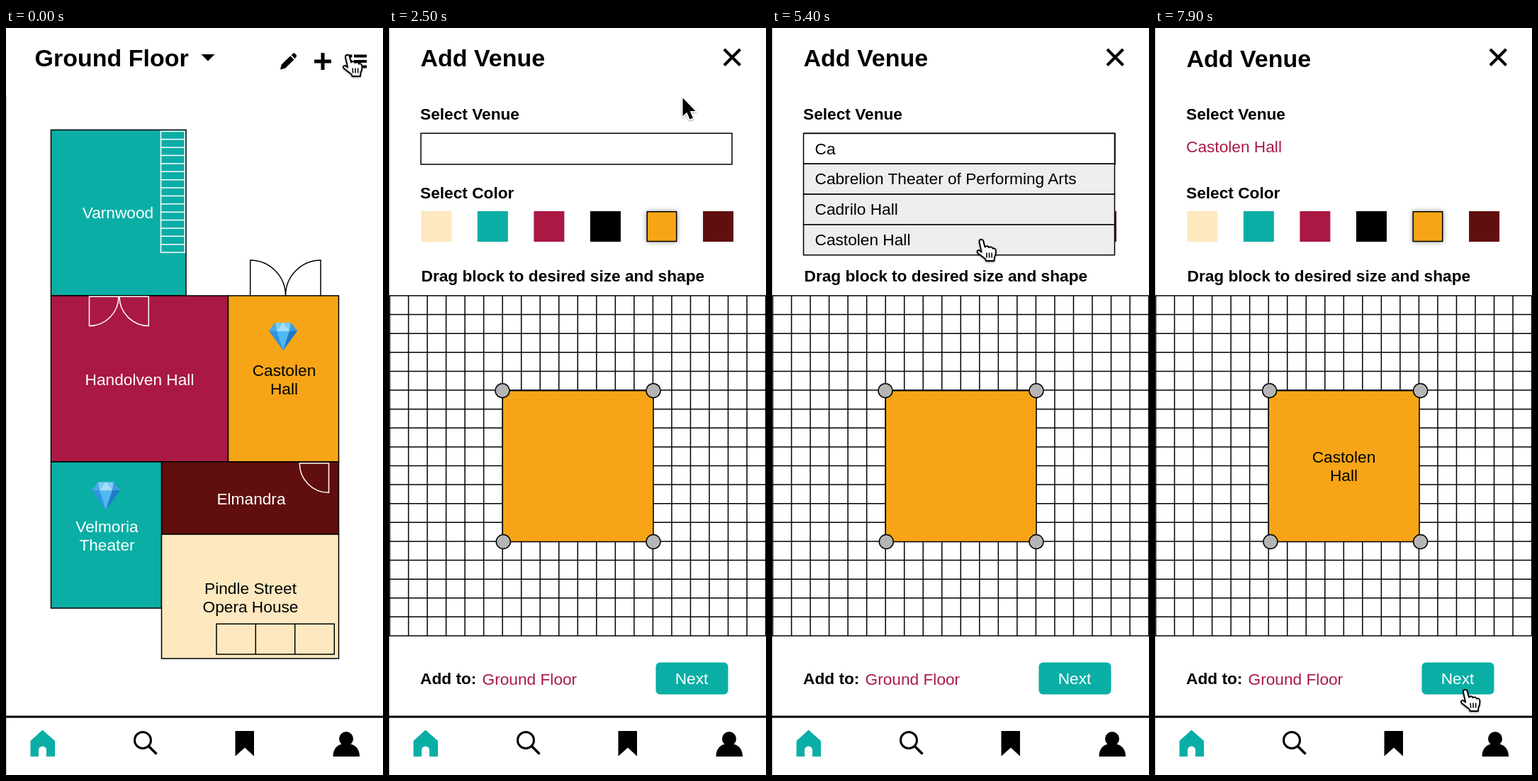
Recreate the animation shown at these times as an HTML page. Size 532x1052 px, loop 8 s.

```html
<!DOCTYPE html>
<html lang="en">
<head>
<meta charset="utf-8">
<title>Floor plan editor</title>
<style>
  html, body { margin: 0; height: 100%; overflow: hidden; background: #fff; }
  svg { display: block; width: 532px; height: 1052px; }
  text { font: 22.7px "Liberation Sans", Arial, sans-serif; white-space: pre; }
  .bold { font-weight: bold; }
  .title { font-weight: bold; font-size: 34px; }
  .menu { font-size: 23px; }
  .mid { text-anchor: middle; }
  .line { fill: none; stroke-width: 1.5; }
</style>
</head>
<body>
<svg id="stage" viewBox="0 0 532 1052"></svg>
<script>
const TEAL = '#0aaea5', CRIMSON = '#a91944', ORANGE = '#f7a516', MAROON = '#610e0e', CREAM = '#fde8bf';
const VENUE = ['Castolen', 'Hall'];

const range = (n, fn) => Array.from({ length: n }, (_, i) => fn(i)).join('');
const text = (x, y, str, cls = '', fill = '#000') =>
  `<text x="${x}" y="${y}" class="${cls}" fill="${fill}">${str}</text>`;
const centered = (x, y, lines, fill) =>
  lines.map((str, i) => text(x, y + i * 25.8, str, 'mid', fill)).join('');
const rect = (x1, y1, x2, y2, fill, stroke = 'none') =>
  `<rect x="${x1}" y="${y1}" width="${x2 - x1}" height="${y2 - y1}" fill="${fill}" stroke="${stroke}" stroke-width="1.5"/>`;
const shape = (d, fill = '#000') => `<path d="${d}" fill="${fill}"/>`;
const line = (d, stroke = '#000', width = 1.5) =>
  `<path class="line" d="${d}" stroke="${stroke}" style="stroke-width:${width}"/>`;
const circle = (x, y, r, fill, stroke = 'none', width = 1.5) =>
  `<circle cx="${x}" cy="${y}" r="${r}" fill="${fill}" stroke="${stroke}" stroke-width="${width}"/>`;
const group = (id, body) => `<g id="${id}">${body}</g>`;

const gem = (x, y) => `<g transform="translate(${x} ${y})">` +
  shape('M9 0H31L40 11.5L20 39L0 11.5Z', '#2f93dd') +
  shape('M9 0L11 12L0 11.5Z', '#4aa9e6') +
  shape('M9 0H31L29 12H11Z', '#7ccbf5') +
  shape('M20 0L29 12H11Z', '#a5def9') +
  shape('M31 0L40 11.5L29 12Z', '#3a9de2') +
  shape('M11 12H29L20 39Z', '#4fb9f3') +
  shape('M29 12L40 11.5L20 39Z', '#1f79c6') + '</g>';

const plusIcon = line('M435 47H459M447 35V59', '#000', 5);

const tabBar =
  rect(0, 968.5, 532, 971.5, '#000') +
  shape('M51.5 988.5L34.5 1004V1026H46V1017a5.5 5.5 0 0 1 11 0V1026H69V1004Z', TEAL) +
  circle(193, 1003, 11.5, 'none', '#000', 3) + line('M201 1011L212.5 1022.5', '#000', 3.6) +
  shape('M323.5 990H350V1025.5L337 1013.5L323.5 1025.5Z') +
  circle(480, 1001, 10, '#000') +
  shape('M461.5 1026C461.5 1013 470 1007.5 480 1007.5S499 1013 499 1026Z');

const floorPage =
  rect(0, 95, 1, 1052, '#c8c8c8') +
  text(40.5, 54, 'Ground Floor', 'title') +
  shape('M275.5 37H294.5L285 46.5Z') +
  shape('M387 58.5L388.8 51.5L401.3 39.3L406.5 44.5L394 56.7Z') +
  shape('M402.6 38L404.8 36Q406.4 34.6 408 36.2L409.4 37.6Q411 39.3 409.6 40.8L407.8 43.2Z') +
  plusIcon +
  [39.5, 47, 54.5].map(y => line(`M484 ${y}h4.5M491 ${y}h18`, '#000', 4.2)).join('') +
  rect(63.5, 143.5, 254, 377, TEAL, '#000') +
  rect(63.5, 377, 313.5, 611, CRIMSON, '#000') +
  rect(313.5, 377, 469.5, 611, ORANGE, '#000') +
  rect(219.5, 611, 469.5, 713, MAROON, '#000') +
  rect(63.5, 611, 219.5, 817, TEAL, '#000') +
  rect(219.5, 713, 469.5, 888, CREAM, '#000') +
  rect(218.5, 145.5, 252.3, 316, 'none', '#fff') +
  range(14, i => line(`M218.5 ${145.5 + (i + 1) * 11.37}H252.3`, '#fff')) +
  line('M159 378.3H117.5V419.5A41.5 41.5 0 0 0 159 378.3H201.3V419.5A41.5 41.5 0 0 1 160 378.3', '#fff') +
  line('M344.7 377V327A50 50 0 0 1 394.5 377A50 50 0 0 1 444 327V377') +
  line('M414.3 613H455.5V654.3A41.2 41.2 0 0 1 414.3 613Z', '#fff') +
  line('M297 839.3H463.3V882H297ZM352.3 839.3V882M407.7 839.3V882') +
  gem(371, 415) + gem(121, 639.5) +
  centered(158, 268, ['Varnwood'], '#fff') +
  centered(188.5, 502.5, ['Handolven Hall'], '#fff') +
  centered(392.5, 490, VENUE) +
  centered(346, 670.5, ['Elmandra'], '#fff') +
  centered(142.5, 710.3, ['Velmoria', 'Theater'], '#fff') +
  centered(345, 797, ['Pindle Street', 'Opera House']);

const menu =
  `<path d="M428.5 29.5H465.3V166H307.5V65.5H428.5Z" fill="#fff" stroke="#000" stroke-width="1.5"/>` +
  plusIcon + text(331, 105, 'Add Block', 'menu') + text(331, 143, 'Add Floor', 'menu');

const swatches = [CREAM, TEAL, CRIMSON, '#000', ORANGE, MAROON].map((color, i) => {
  const x = 45.3 + i * 79.55;
  return color === ORANGE
    ? `<g filter="url(#glow)">${rect(x + .7, 258.7, x + 42.2, 300.5, color, '#000')}</g>`
    : rect(x, 258, x + 43, 301, color);
}).join('');

const venuePage =
  rect(0, 0, 1, 1052, '#c8c8c8') +
  line('M473 30L495.5 52.5M495.5 30L473 52.5', '#000', 4) +
  text(44, 129, 'Select Venue', 'bold') +
  text(44, 240, 'Select Color', 'bold') + swatches +
  text(45.5, 356.7, 'Drag block to desired size and shape', 'bold') +
  range(19, i => line(`M0 ${377 + i * 26.61}H532`)) +
  range(21, i => line(`M${1 + i * 26.53} 377V856`)) +
  rect(160.3, 510.7, 373, 723.5, ORANGE, '#000') +
  text(44, 923.7, 'Add to:', 'bold') +
  text(131.5, 924.7, 'Ground Floor', '', CRIMSON) +
  `<rect x="376.5" y="893.5" width="102" height="45" rx="6" fill="${TEAL}"/>` +
  text(427, 923.5, 'Next', 'mid', '#fff');

const handles = shift => [[160, 510.7], [373, 510.7], [161.3, 723.5], [373, 723.5]]
  .map(([x, y]) => circle(x + shift, y, 10, '#b5b5b5', '#000')).join('');

const emptyForm = text(44.5, 54, 'Add Venue', 'title') +
  rect(45, 148.3, 484, 192, '#fff', '#000') + handles(0);

const dropdown = ['Ca', 'Cabrelion Theater of Performing Arts', 'Cadrilo Hall', VENUE.join(' ')]
  .map((str, i) => rect(44.5, 148.5 + i * 42.8, 483.5, 191.3 + i * 42.8, i ? '#eee' : '#fff', '#000') +
    text(60.5, 177.5 + i * 42.7, str)).join('');

const filledForm = text(44.5, 55.3, 'Add Venue', 'title') +
  text(44, 174.8, VENUE.join(' '), '', CRIMSON) +
  handles(1.6) + centered(266.5, 612.3, VENUE);

const arrow = `<path d="M0 0V25.5L5.8 20.2L10 30L14.4 28.2L10.2 18.6H18Z" fill="#000" stroke="#fff"
  stroke-width="3" paint-order="stroke" stroke-linejoin="round"/>`;
const hand = `<path d="M-4 3C-4.2-.8 .6-1.4 1.6 1.8L4 10.5C6 8.6 9 9 9.6 11.2C11.6 9.7 14.2 10.2 14.9 12.6
  C17.6 11.6 19.4 13.2 19.4 16C19.6 20 19 22.3 17.4 25.2L17 30H5.6L4.6 27.3L-5.4 19.6C-9 16.4-5.6 13.6-2.8 16L-.8 17.6Z"
  fill="#fff" stroke="#000" stroke-width="1.9" stroke-linejoin="round"/>` +
  line('M6.2 18.5l.4 7M9.9 18.5l.3 7M13.6 18.5l.1 7', '#000', 1.6);

const stage = document.getElementById('stage');
stage.innerHTML =
  `<defs><filter id="glow" x="-40%" y="-40%" width="180%" height="180%">
     <feDropShadow dx="0" dy="0" stdDeviation="3.5" flood-opacity=".4"/></filter>
   <filter id="shade" x="-40%" y="-40%" width="180%" height="180%">
     <feDropShadow dx="0" dy="1.2" stdDeviation="1.1" flood-opacity=".4"/></filter></defs>` +
  rect(0, 0, 532, 1052, '#fff') +
  group('floor', floorPage) + group('menu', menu) +
  group('venue', venuePage) + group('empty', emptyForm) +
  group('dropdown', dropdown) + group('filled', filledForm) + tabBar +
  `<g id="cursor" filter="url(#shade)">${group('arrow', arrow)}${group('hand', hand)}</g>`;

// Cursor moves: start, end, then the point reached.
const home = [483, 38];
const moves = [
  [0, 500, 447, 38],
  [1200, 1900, 414.5, 98.5],
  [3500, 3900, 372, 166],
  [4300, 5400, 296.5, 298],
  [6400, 7100, 363, 598],
  [7300, 7800, 439, 932],
];
const ease = u => u < .5 ? 4 * u ** 3 : 1 - 4 * (1 - u) ** 3;

function cursorAt(t) {
  let [x, y] = home;
  for (const [start, end, toX, toY] of moves) {
    if (t <= start) break;
    const k = ease(Math.min(1, (t - start) / (end - start)));
    x += (toX - x) * k;
    y += (toY - y) * k;
  }
  return [x, y];
}

function isClickable(t, x, y) {
  if (t < 2500) return y < 62 ? x < 463 || x > 482 : y > 84;
  if (t < 4100) return y > 148;
  if (t < 5700) return y < 192 || y > 277;
  return y > 893;
}

const show = (id, on) => document.getElementById(id).setAttribute('display', on ? 'inline' : 'none');

function draw() {
  const t = Math.floor(performance.now() % 8000 / 100) * 100;
  const [x, y] = cursorAt(t);
  const onLink = isClickable(t, x, y);
  show('floor', t < 2500);
  show('menu', t >= 700 && t < 2500);
  show('venue', t >= 2500);
  show('empty', t >= 2500 && t < 5700);
  show('dropdown', t >= 4100 && t < 5700);
  show('filled', t >= 5700);
  show('hand', onLink);
  show('arrow', !onLink);
  document.getElementById('cursor').setAttribute('transform', `translate(${x} ${y})`);
  requestAnimationFrame(draw);
}
draw();
</script>
</body>
</html>
```
